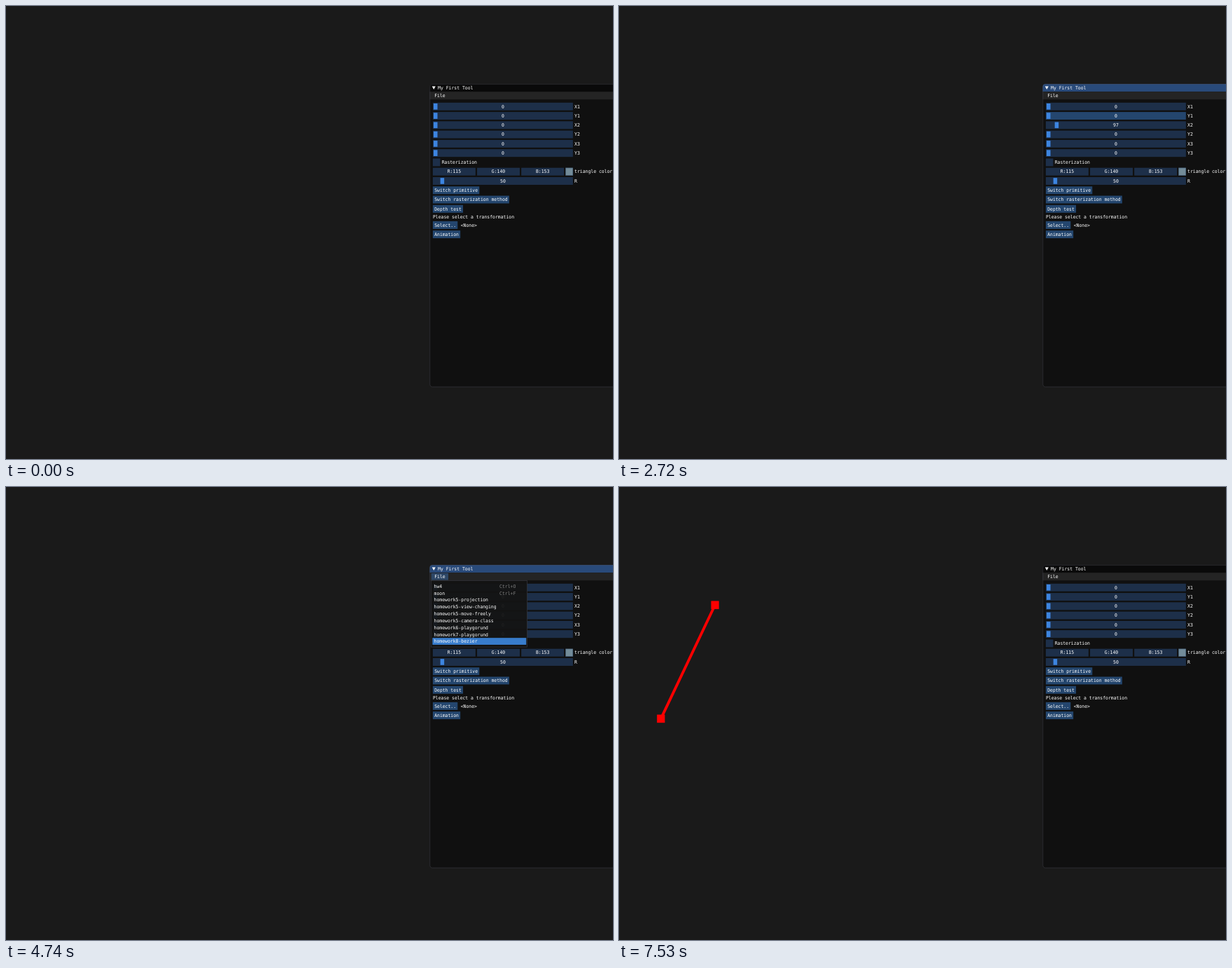
An HTML page with a canvas that plays this animation: 866x646 px, repeating every 8 s.

```html
<!DOCTYPE html>
<html>
<head>
<meta charset="utf-8">
<style>
html, body { margin: 0; width: 100%; height: 100%; overflow: hidden; background: #1a1a1a; }
canvas { display: block; }
</style>
</head>
<body>
<canvas id="stage" width="866" height="646"></canvas>
<script>
const ctx = document.getElementById('stage').getContext('2d');
const LOOP = 8000;

// The panel is laid out in its own pixels, then scaled onto the stage.
const PANEL = { x: 604.5, y: 111.3, sx: 0.553, sy: 0.577, w: 556, h: 749 };
const LEFT = 8, ROW = 23, TOP = 46, FRAME_H = 19, CHAR = 7, ITEM_W = 361.5;

const blue = alpha => `rgba(66,150,250,${alpha})`;
const FRAME = { idle: 'rgba(41,74,122,.54)', hover: blue(.4), active: blue(.67) };
const BORDER = 'rgba(110,110,128,.5)';
const MENU = ['hw4', 'moon', 'homework5-projection', 'homework5-view-changing',
  'homework5-move-freely', 'homework5-camera-class', 'homework6-playgorund',
  'homework7-playgorund', 'homework8-bezier'];

// Each step starts at a time and changes part of the state.
const idle = { focus: false, over: '', mode: 'hover', x2: 0, file: 0, item: -1, points: 0 };
const steps = [
  [0, {}],
  [1500, { focus: true, over: 'X2', mode: 'active', x2: 97 }],
  [1710, { over: '', mode: 'hover' }],
  [1910, { over: 'X1' }],
  [2110, { over: '' }],
  [2320, { over: 'X2' }],
  [2520, { over: '' }],
  [2720, { over: 'Y1' }],
  [2920, { over: 'X2' }],
  [3120, { mode: 'active', x2: 107 }],
  [3330, { x2: 0 }],
  [3530, { over: '', mode: 'hover' }],
  [3730, { over: 'X1' }],
  [3940, { over: '' }],
  [4140, { file: .8 }],
  [4340, { menu: true }],
  [4540, { file: .31, item: 4 }],
  [4740, { item: 8 }],
  [5560, { file: 0, menu: false, item: -1 }],
  [5800, { over: 'check' }],
  [6000, { over: '' }],
  [6680, { focus: false }],
  [6880, { points: 1 }],
  [7530, { points: 2 }]
];

function stateAt(time) {
  return Object.assign({}, idle, ...steps.filter(s => s[0] <= time).map(s => s[1]));
}

function box(x, y, w, h, color) {
  ctx.fillStyle = color;
  ctx.fillRect(x, y, w, h);
}

function text(str, x, y, color = '#fff') {
  ctx.fillStyle = color;
  ctx.fillText(str, x, y + 10.4);
}

function field(str, x, y, w, color) {
  box(x, y, w, FRAME_H, color);
  text(str, x + (w - str.length * CHAR) / 2, y + 3);
}

function slider(label, y, value, max, mode = 'idle') {
  box(LEFT, y, ITEM_W, FRAME_H, FRAME[mode]);
  box(LEFT + 2 + value / max * (ITEM_W - 14), y + 2, 10, 15,
    mode === 'active' ? blue(1) : 'rgb(61,133,224)');
  const str = String(value);
  text(str, LEFT + (ITEM_W - str.length * CHAR) / 2, y + 3);
  text(label, LEFT + ITEM_W + 4, y + 3);
}

function button(label, y) {
  field(label, LEFT, y, label.length * CHAR + 8, blue(.4));
}

function titleBar(s) {
  ctx.fillStyle = s.focus ? 'rgb(41,74,122)' : 'rgb(10,10,10)';
  ctx.beginPath();
  ctx.roundRect(0, 0, PANEL.w, FRAME_H, [7, 7, 0, 0]);
  ctx.fill();
  ctx.fillStyle = '#fff';
  ctx.beginPath();
  ctx.moveTo(6, 5.6);
  ctx.lineTo(15, 5.6);
  ctx.lineTo(10.5, 13.4);
  ctx.fill();
  text('My First Tool', 21, 3);

  box(0, 19, PANEL.w, 19, 'rgb(36,36,36)');
  if (s.file) box(4, 20, 44, 17, blue(s.file));
  text('File', 12, 22);
}

function colorRow(y) {
  const w = (ITEM_W - 23 - 8) / 3;
  ['R:115', 'G:140', 'B:153'].forEach((str, i) =>
    field(str, LEFT + i * (w + 4), y, w, FRAME.idle));
  const x = LEFT + ITEM_W - 19;
  box(x, y, 19, 19, 'rgb(115,140,153)');
  ctx.strokeStyle = FRAME.idle;
  ctx.strokeRect(x + .5, y + .5, 18, 18);
  text('triangle color', x + 23, y + 3);
}

function popup(s) {
  box(3, 38, 249, 165, 'rgba(20,20,20,.94)');
  ctx.strokeStyle = BORDER;
  ctx.strokeRect(3.5, 38.5, 248, 164);
  MENU.forEach((label, i) => {
    const y = TOP + i * 17;
    if (i === s.item) box(7, y - 2, 242, 17, blue(.8));
    text(label, 11, y);
    if (i < 2) text(['Ctrl+O', 'Ctrl+F'][i], 180, y, 'rgb(128,128,128)');
  });
}

function panel(s) {
  ctx.setTransform(PANEL.sx, 0, 0, PANEL.sy, PANEL.x, PANEL.y);
  ctx.font = '11.63px "DejaVu Sans Mono", monospace';
  ctx.textRendering = 'geometricPrecision';
  ctx.lineWidth = 1;
  ctx.beginPath();
  ctx.roundRect(0, 0, PANEL.w, PANEL.h, 7);
  ctx.fillStyle = 'rgba(15,15,15,.94)';
  ctx.fill();
  titleBar(s);
  ctx.strokeStyle = BORDER;
  ctx.beginPath();
  ctx.roundRect(.5, .5, PANEL.w - 1, PANEL.h - 1, 7);
  ctx.stroke();

  const row = i => TOP + i * ROW;
  const mode = id => s.over === id ? s.mode : 'idle';
  ['X1', 'Y1', 'X2', 'Y2', 'X3', 'Y3'].forEach((id, i) =>
    slider(id, row(i), id === 'X2' ? s.x2 : 0, 1600, mode(id)));
  box(LEFT, row(6), 19, 19, FRAME[mode('check')]);
  text('Rasterization', LEFT + 23, row(6) + 3);
  colorRow(row(7));
  slider('R', row(8), 50, 1000);
  button('Switch primitive', row(9));
  button('Switch rasterization method', row(10));
  button('Depth test', row(11));
  text('Please select a transformation', LEFT, row(12));
  button('Select..', row(12) + 17);
  text('<None>', 80, row(12) + 20);
  button('Animation', row(13) + 17);
  if (s.menu) popup(s);
}

function curve(count) {
  const points = [[59.8, 330.4], [137, 168.3]].slice(0, count);
  ctx.strokeStyle = '#f00';
  ctx.lineWidth = 3.8;
  ctx.beginPath();
  points.forEach(([x, y]) => {
    ctx.lineTo(x, y);
    box(x - 5.6, y - 5.8, 11.2, 11.6, '#f00');
  });
  ctx.stroke();
}

function draw(now) {
  const s = stateAt(now % LOOP);
  ctx.setTransform(1, 0, 0, 1, 0, 0);
  box(0, 0, 866, 646, '#1a1a1a');
  curve(s.points);
  panel(s);
  requestAnimationFrame(draw);
}
draw(0);
</script>
</body>
</html>
```
